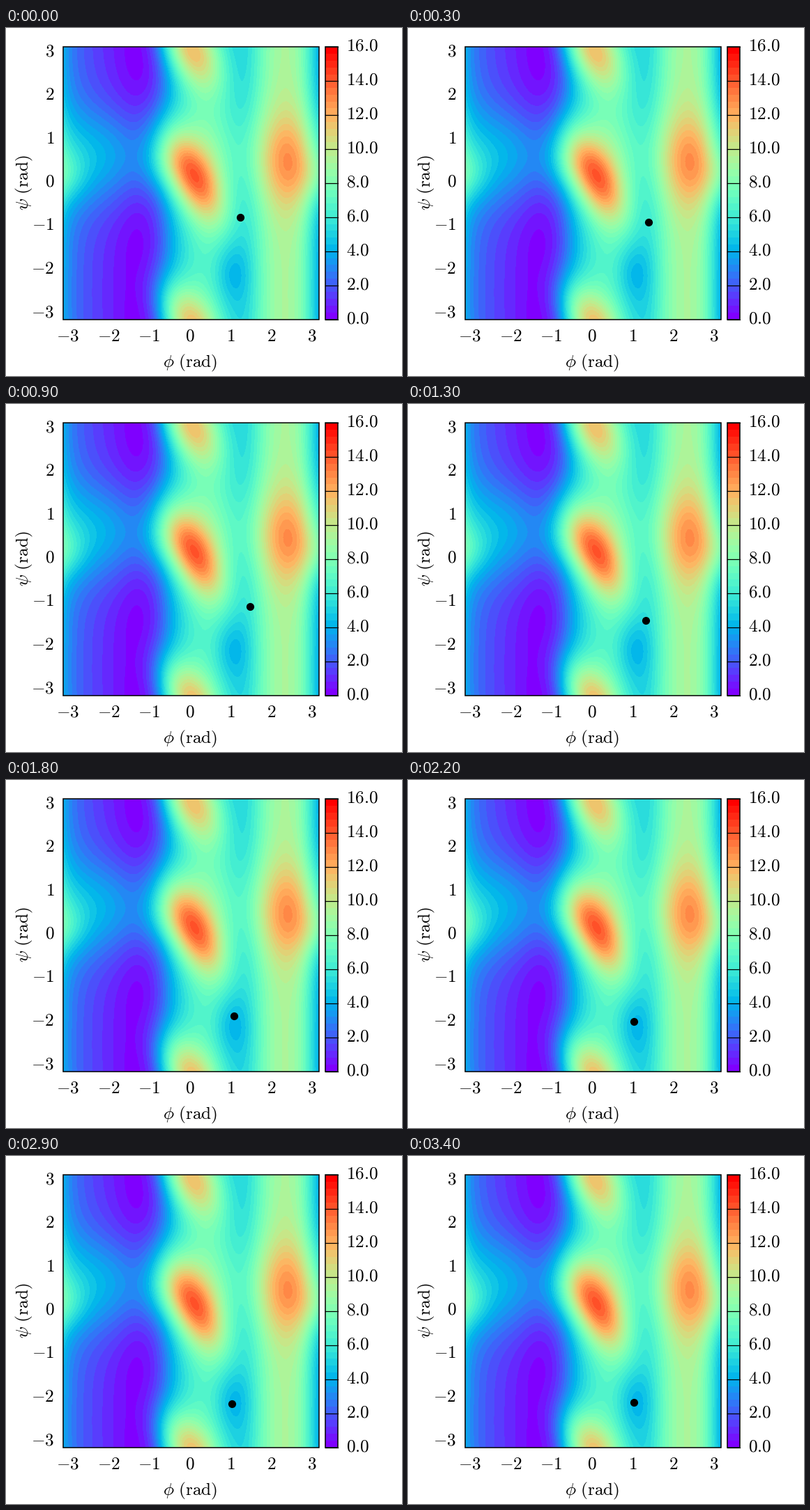
Animation, 568 px wide and 500 px high, one loop 3.5 s. Source, as a matplotlib script:

```python
import numpy as np
import matplotlib.pyplot as plt
from matplotlib.animation import FuncAnimation
from matplotlib.patches import Rectangle

W, H, DPI = 568, 500, 100
FRAMES, STEP = 35, 100
LEFT, RIGHT, TOP, BOTTOM = 82, 449, 27, 419
PW, PH = RIGHT - LEFT, BOTTOM - TOP
BAR_L, BAR_R = 458, 476
LEVELS, VMAX = 40, 16
FONT = 18.2

plt.rcParams["mathtext.fontset"] = "cm"

# Energy along phi, evenly spaced over one period
PROFILE = [4.0, 2.1, 1.3, 0.6, 0.1, 1.0, 3.8, 6.0, 6.6, 5.6, 5.4, 7.7, 9.2, 8.0]

# Gaussian hills: height, centre x, centre y, width, length, tilt
HILLS = [
    (1.6, 265, 183, np.inf, 50, 0),   # ridge across all phi
    (1.3, 145, 185, 60, 50, 0),       # saddle between the left basins
    (1.6, 85, 212, 22, 26, 0),        # left edge
    (1.8, 403, 197, 26, 45, 0),       # right barrier
    (6.4, 268, 214, 23.5, 51, 0.5),   # central barrier
    (1.2, 222, 195, 22, 28, 0),       # its left flank
    (5.6, 260, 420, 24, 44, 0.55),    # barrier across the psi border
    (-1.2, 323, 352, 18, 30, 0),      # basin the walker falls into
]


def bspline(t, n):
    d = np.abs((t[:, None] - np.arange(n) + n / 2) % n - n / 2)
    inner = 2 / 3 - d**2 + d**3 / 2
    outer = np.clip(2 - d, 0, None) ** 3 / 6
    return np.where(d < 1, inner, outer)


def periodic_spline(values, m):
    n = len(values)
    coef = np.linalg.solve(bspline(np.arange(n), n), values)
    return bspline((np.arange(m) + 0.5) * n / m, n) @ coef


def wrap(d, period):
    return (d + period / 2) % period - period / 2


def energy():
    x = np.arange(PW) + 0.5 + LEFT
    y = (np.arange(PH) + 0.5 + TOP)[:, None]
    v = periodic_spline(PROFILE, PW) + 0 * y
    for amp, cx, cy, width, length, tilt in HILLS:
        dx, dy = wrap(x - cx, PW), wrap(y - cy, PH)
        c, s = np.cos(tilt), np.sin(tilt)
        across, along = c * dx - s * dy, s * dx + c * dy
        v = v + amp * np.exp(-((across / width) ** 2 + (along / length) ** 2) / 2)
    return v


# Walker path: time (ms), x, y
T, PX, PY = np.array([
    (0, 336.2, 271.5), (500, 348.8, 283.5), (900, 350.2, 291),
    (1800, 326.8, 338.5), (2500, 324.3, 351), (2900, 324, 356),
    (3400, 324.3, 353.5),
]).T


def hermite(t, p):
    slope = np.gradient(p, T)
    i = min(np.searchsorted(T, t, side="right") - 1, len(T) - 2)
    h = T[i + 1] - T[i]
    s = (t - T[i]) / h
    return ((1 + 2 * s) * (1 - s) ** 2 * p[i] + s * (1 - s) ** 2 * h * slope[i]
            + s * s * (3 - 2 * s) * p[i + 1] + s * s * (s - 1) * h * slope[i + 1])


fig = plt.figure(figsize=(W / DPI, H / DPI), dpi=DPI, facecolor="white")
ax = fig.add_axes([0, 0, 1, 1])


def label(x, y, s, ha="center", **kw):
    ax.text(x, y, f"${s}$", ha=ha, va="baseline", fontsize=FONT, **kw)


def panel(data, x0, x1):
    ax.imshow(data, extent=(x0, x1, BOTTOM, TOP), cmap=plt.get_cmap("rainbow", LEVELS),
              vmin=0, vmax=VMAX, interpolation="nearest", aspect="auto")
    ax.add_patch(Rectangle((x0, TOP), x1 - x0, PH, fill=False,
                           ec="black", lw=1.1, zorder=3))


panel(energy(), LEFT, RIGHT)
panel(np.linspace(VMAX, 0, PH)[:, None], BAR_L, BAR_R)

cx, cy = (LEFT + RIGHT) / 2 - 1.6, (TOP + BOTTOM) / 2
for v in range(-3, 4):
    label(cx + v * 58.3, 450, v)
    label(69.2, cy - v * 62.4 + 5, v, ha="right")

for v in range(0, VMAX + 1, 2):
    y = BOTTOM - v * PH / VMAX
    label(487.5, y + 5.5, f"{v:.1f}", ha="left")
    ax.plot([BAR_L, BAR_R], [y, y], color="black", lw=0.9, zorder=3)

label(264, 487.5, r"\phi\ \mathrm{(rad)}")
label(32.5, 222, r"\psi\ \mathrm{(rad)}", rotation=90, rotation_mode="anchor")

dot, = ax.plot([], [], "o", color="black", ms=11.2 * 72 / DPI, mew=0, zorder=4)

ax.set_xlim(0, W)
ax.set_ylim(H, 0)
ax.axis("off")


def draw(i):
    t = i * STEP
    dot.set_data([hermite(t, PX)], [hermite(t, PY)])
    return dot,


anim = FuncAnimation(fig, draw, frames=FRAMES, interval=STEP, repeat=True, repeat_delay=0)
plt.show()
```
